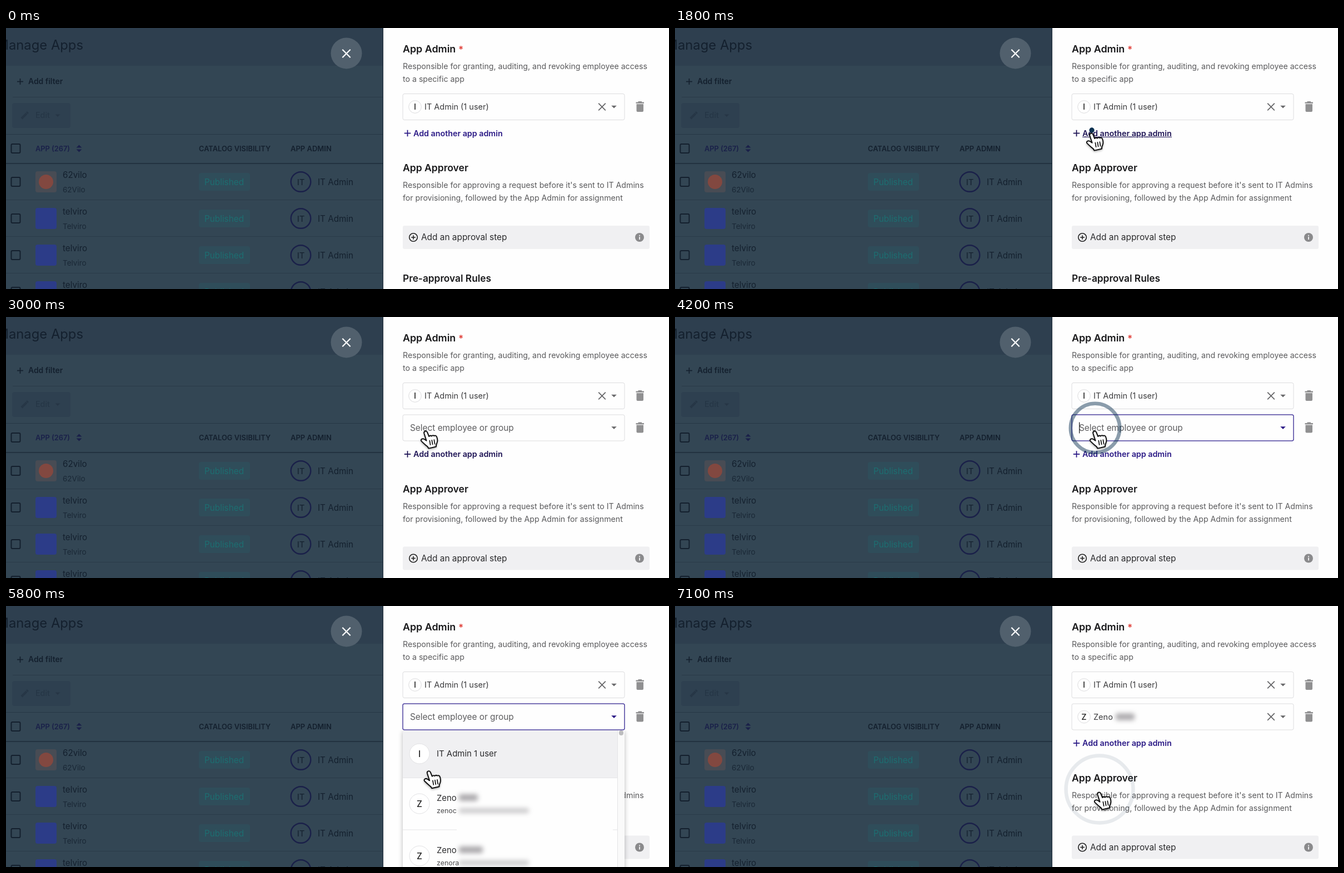
Recreate the animation shown at these times as an HTML page with a canvas. Size 1193 by 470 pixels, loop 8300 ms.

```html
<!DOCTYPE html>
<html lang="en">
<head>
<meta charset="utf-8">
<title>App admin panel</title>
<style>
html, body { margin: 0; width: 100%; height: 100%; overflow: hidden; background: #fefefe; }
canvas { display: block; }
</style>
</head>
<body>
<canvas id="stage" width="1193" height="470"></canvas>
<script>
const W = 1193, H = 470, LOOP = 8300, PANEL_X = 679;
const ctx = document.getElementById('stage').getContext('2d');
const FONT = 'Inter, "Open Sans", sans-serif';
const INK = '#14202e', NAVY = '#1a2049', FAINT = '#263646', RULE = '#2a3b49';
const PURPLE = '#2b1a86', FOCUS_EDGE = '#4c409f', GREY = '#5a5a5c', TITLE = '#19191b';
const ROW_SHIFT = 57.5, CLICK_LAG = 100, RING_MS = 500;
const T = {
  enter: 130, arrive: 830, hover: 1030, click1: 1800, nudge: 3000, click2: 3860,
  open: 4700, move: 5490, stop: 5980, click3: 6630, freeze: 7100
};
const ADDED = T.click1 + CLICK_LAG;
const FOCUS = T.click2 + CLICK_LAG;
const PICKED = T.click3 + CLICK_LAG;
const START = [632, -31], LINK = [750, 184], FIELD = [756, 200], ITEM = [764, 330];

function text(s, x, y, size, color, weight = 400, align = 'left') {
  ctx.font = `${weight} ${size}px ${FONT}`;
  ctx.fillStyle = color;
  ctx.textAlign = align;
  ctx.fillText(s, x, y);
}

function rect(x, y, w, h, color) {
  ctx.fillStyle = color;
  ctx.fillRect(x, y, w, h);
}

function box(x, y, w, h, r, fill, stroke, lw = 1) {
  ctx.beginPath();
  ctx.roundRect(x, y, w, h, r);
  paint(fill, stroke, lw);
}

function circle(x, y, r, fill, stroke, lw = 1) {
  ctx.beginPath();
  ctx.arc(x, y, r, 0, Math.PI * 2);
  paint(fill, stroke, lw);
}

function paint(fill, stroke, lw) {
  if (fill) { ctx.fillStyle = fill; ctx.fill(); }
  if (stroke) { ctx.strokeStyle = stroke; ctx.lineWidth = lw; ctx.stroke(); }
}

function line(x1, y1, x2, y2, color, lw) {
  ctx.beginPath();
  ctx.moveTo(x1, y1);
  ctx.lineTo(x2, y2);
  paint(null, color, lw);
}

function plus(x, y, r, color, lw) {
  line(x - r, y, x + r, y, color, lw);
  line(x, y - r, x, y + r, color, lw);
}

function cross(x, y, r, color, lw) {
  line(x - r, y - r, x + r, y + r, color, lw);
  line(x - r, y + r, x + r, y - r, color, lw);
}

// Triangle with its flat side at y; negative h points up.
function caret(x, y, w, h, color) {
  ctx.beginPath();
  ctx.moveTo(x - w, y);
  ctx.lineTo(x + w, y);
  ctx.lineTo(x, y + h);
  ctx.closePath();
  paint(color);
}

function smudge(x, y, w, h, alpha) {
  ctx.save();
  ctx.filter = 'blur(4px)';
  box(x, y, w, h, 4, `rgba(70,66,72,${alpha})`);
  ctx.restore();
}

function drawTable() {
  rect(0, 0, PANEL_X, H, '#334654');
  rect(0, 0, PANEL_X, 68, '#2e3f4f');
  text('Manage Apps', 139, 39, 23.8, INK, 400, 'right');

  plus(25.5, 96.5, 5.5, INK, 1.7);
  text('Add filter', 40, 101, 13.9, INK, 600);
  rect(12, 124, PANEL_X - 12, 1, RULE);

  box(11, 135, 105, 45, 4, '#2e4050');
  line(28, 163, 37, 154, FAINT, 4);
  line(37.5, 153.5, 39.5, 151.5, FAINT, 4);
  text('Edit', 53, 162, 14.3, FAINT, 500);
  caret(93, 155.5, 4.5, 4.5, FAINT);

  rect(0, 191, PANEL_X, 1, '#263745');
  box(9.5, 209, 16, 16, 2, null, INK, 2);
  text('APP (267)', 53, 221.5, 12.8, NAVY, 600);
  caret(131.5, 215.5, 5, -5, NAVY);
  caret(131.5, 218.5, 5, 5, NAVY);
  text('CATALOG VISIBILITY', 347, 221.5, 12.85, INK, 600);
  text('APP ADMIN', 512, 221.5, 13, INK, 600);
  rect(0, 243, PANEL_X, 2, '#223240');

  drawRow(277, '62vilo', '62Vilo', true);
  for (let i = 1; i < 4; i++) drawRow(277 + i * 66, 'telviro', 'Telviro');

  circle(612.5, 45.5, 28, '#51606d');
  cross(612.5, 46, 7.2, '#fff', 2.2);
}

function drawRow(y, name, vendor, round) {
  box(9.5, y - 8, 16, 16, 2, null, INK, 2);
  box(53, y - 19, 38, 38, 4, round ? '#484c54' : '#2c3c88');
  if (round) circle(72, y, 13, '#824840');
  text(name, 102, y - 7, 15.2, INK);
  text(vendor, 102, y + 19, 13.5, '#1a2836');
  box(347, y - 16, 92, 32, 4, '#2f4d5a');
  text('Published', 357, y + 5.5, 15.3, '#1d6e71');
  circle(530.5, y, 17.8, null, NAVY, 2.4);
  text('IT', 530.5, y + 5.5, 15, INK, 400, 'center');
  text('IT Admin', 561, y + 5.5, 15.2, INK);
  rect(0, y + 32, PANEL_X, 1, RULE);
}

function drawTrash(y) {
  const c = '#909091';
  rect(1133.5, y - 8.5, 14.5, 2.4, c);
  rect(1137.5, y - 10, 6.5, 2, c);
  box(1134.5, y - 5, 12.5, 14, [0, 0, 2, 2], c);
}

function drawField(y, letter, label, focused) {
  box(714, y - 23.5, 399, 47, 3, '#fefefe', focused ? FOCUS_EDGE : '#dcdcde', focused ? 1.5 : 1);
  if (letter) {
    circle(736, y, 11.3, '#fff', '#dcdcde');
    text(letter, 736, y + 5.2, 14.5, '#222', 500, 'center');
    text(label, 753, y + 5.2, 14.5, '#3c3c3e');
    cross(1072.5, y, 6.3, '#646466', 1.7);
  } else {
    text(label, 727, y + 5.2, 15.38, '#5c5c5e');
  }
  caret(1094, y - 2.3, 4.8, 4.8, focused ? PURPLE : '#69696b');
  drawTrash(y);
}

function drawPanel(t) {
  rect(PANEL_X, 0, W - PANEL_X, H, '#fefefe');
  rect(PANEL_X - 1, 0, 1, H, '#1f2c38');
  text('App Admin', 714, 44, 17.85, TITLE, 600);
  text('*', 814, 45, 17, '#e0403a', 600);
  text('Responsible for granting, auditing, and revoking employee access', 714, 74, 14.16, GREY);
  text('to a specific app', 714, 97, 14.16, GREY);
  drawField(142, 'I', 'IT Admin (1 user)', false);

  const added = t >= ADDED, picked = t >= PICKED;
  if (added) {
    const y = 142 + ROW_SHIFT, focused = t >= FOCUS && !picked;
    drawField(y, picked ? 'Z' : '', picked ? 'Zeno' : 'Select employee or group', focused);
    if (picked) smudge(793, y - 6, 34, 12, 0.45);
    const lit = Math.floor((t - FOCUS) / 500) % 2 === 0;
    if (focused && lit) rect(727, 189.5, 1.3, 20, '#222');
  }

  ctx.save();
  if (added) ctx.translate(0, ROW_SHIFT);
  drawLink(t >= T.hover && t < FOCUS ? '#1e1455' : PURPLE, t >= T.hover && !added);

  text('App Approver', 714, 258, 17.55, TITLE, 600);
  text("Responsible for approving a request before it's sent to IT Admins", 714, 288, 14.17, GREY);
  text('for provisioning, followed by the App Admin for assignment', 714, 311, 14.17, GREY);

  box(714, 356, 444, 42, 3, '#f0f0f2');
  circle(733, 377, 7.3, null, '#222', 1.6);
  plus(733, 377, 3.8, '#222', 1.6);
  text('Add an approval step', 747, 382.3, 15.4, '#2a2a2c');
  circle(1140, 377, 8, '#8a8a8c');
  rect(1139.1, 376, 1.9, 5, '#f0f0f2');
  rect(1139.1, 372.8, 1.9, 1.9, '#f0f0f2');
  text('Pre-approval Rules', 714, 456.5, 17.3, TITLE, 600);
  ctx.restore();
}

function drawLink(color, underlined) {
  const label = 'Add another app admin', size = 14.27;
  plus(722.5, 189.5, 5.8, color, 1.8);
  if (underlined) {
    rect(733, 195.5, 161, 1.4, color);
    // A pale halo breaks the underline around descenders.
    ctx.font = `600 ${size}px ${FONT}`;
    ctx.textAlign = 'left';
    ctx.strokeStyle = '#fefefe';
    ctx.lineWidth = 2;
    ctx.strokeText(label, 733, 194.5);
  }
  text(label, 733, 194.5, size, color, 600);
}

function drawPerson(y, mail, nameW) {
  circle(744, y, 18, '#fff', '#e2e2e4');
  text('Z', 744, y + 5.5, 15.5, '#222', 500, 'center');
  text('Zeno', 775, y - 5.5, 14.8, '#2a2a2c');
  text(mail, 775, y + 16.5, 12.4, '#4c4c4e');
  smudge(815, y - 17, nameW, 12, 0.45);
  smudge(815, y + 8, 126, 9, 0.28);
}

function drawMenu(hotY) {
  ctx.save();
  ctx.beginPath();
  ctx.rect(690, 224, 450, H - 224);
  ctx.clip();
  ctx.save();
  ctx.shadowColor = 'rgba(0,0,0,.28)';
  ctx.shadowBlur = 8;
  ctx.shadowOffsetY = 2;
  rect(714, 224, 399, 270, '#fefefe');
  ctx.restore();

  const second = hotY >= 309;
  rect(714, second ? 310 : 224, 386, second ? 93 : 85, '#f0f0f2');
  rect(714, 309, 386, 1, '#e6e6e8');
  rect(714, 402.5, 97, 1, '#e6e6e8');
  rect(1092, 402.5, 8, 1, '#e6e6e8');
  circle(744, 266, 18, '#fff', '#e2e2e4');
  text('I', 744, 271.5, 15.5, '#222', 500, 'center');
  text('IT Admin 1 user', 775, 271, 14.95, '#2a2a2c');
  drawPerson(356, 'zenoc', 34);
  drawPerson(450, 'zenora', 43);

  rect(1100, 224, 13, 250, '#fafafa');
  rect(1100, 224, 1, 250, '#e4e4e6');
  box(1103, 224, 8, 9, 4, '#bdbdbf');
  ctx.restore();
}

function glide(a, b, t, from, to) {
  const p = Math.min(1, Math.max(0, (t - from) / (to - from)));
  const e = 0.5 - 0.5 * Math.cos(p * Math.PI);
  return [a[0] + (b[0] - a[0]) * e, a[1] + (b[1] - a[1]) * e];
}

function hotspot(t) {
  if (t < T.nudge) return glide(START, LINK, t, T.enter, T.arrive);
  return glide(FIELD, ITEM, t, T.move, T.stop);
}

function drawRing(t, start, [x, y]) {
  const age = Math.min(t, T.freeze) - start;
  if (age < 0 || age >= RING_MS) return;
  const r = 4.5 + 0.126 * age, lw = Math.min(r, 6.5);
  ctx.save();
  ctx.globalAlpha = Math.cos(age / RING_MS * Math.PI / 2);
  circle(x, y, r - lw / 2, null, '#0c3150', lw);
  ctx.restore();
}

function drawHand([x, y]) {
  ctx.save();
  ctx.translate(x - 10.5, y + 4);
  ctx.lineJoin = ctx.lineCap = 'round';
  ctx.beginPath();
  ctx.moveTo(6.8, 5.5);
  ctx.bezierCurveTo(5.8, 1.5, 11, 0, 12.6, 3.6);
  ctx.lineTo(15.6, 11);
  ctx.quadraticCurveTo(18, 8.6, 20.2, 10.4);
  ctx.quadraticCurveTo(22.6, 8.2, 24.8, 10);
  ctx.quadraticCurveTo(28.4, 8.6, 29.6, 12);
  ctx.quadraticCurveTo(31.8, 18, 30, 22.5);
  ctx.quadraticCurveTo(28, 26, 28.4, 29.5);
  ctx.lineTo(15, 32.6);
  ctx.quadraticCurveTo(14, 29.5, 10.5, 27.4);
  ctx.quadraticCurveTo(6, 23.5, 2, 19.6);
  ctx.bezierCurveTo(-0.4, 16.4, 4, 14, 7, 16);
  ctx.lineTo(11, 18.6);
  ctx.closePath();
  ctx.save();
  ctx.shadowColor = 'rgba(0,0,0,.45)';
  ctx.shadowBlur = 4;
  ctx.shadowOffsetY = 2;
  paint('#fff');
  ctx.restore();
  paint('#fff', '#111', 2);
  for (let i = 0; i < 3; i++) {
    const px = 16.8 + i * 4, py = 18.6 - i * 0.7;
    line(px, py, px + 1.3, py + 7.5, '#111', 1.7);
  }
  ctx.restore();
}

function draw(t) {
  ctx.clearRect(0, 0, W, H);
  const hot = hotspot(t);
  drawTable();
  drawPanel(t);
  if (t >= T.open && t < PICKED) drawMenu(hot[1]);
  if (t >= T.enter) drawHand(hot);
  drawRing(t, T.click1, LINK);
  drawRing(t, T.click2, FIELD);
  drawRing(t, T.click3, ITEM);
}

const began = performance.now();
function tick() {
  draw((performance.now() - began) % LOOP);
  requestAnimationFrame(tick);
}
tick();
</script>
</body>
</html>
```
